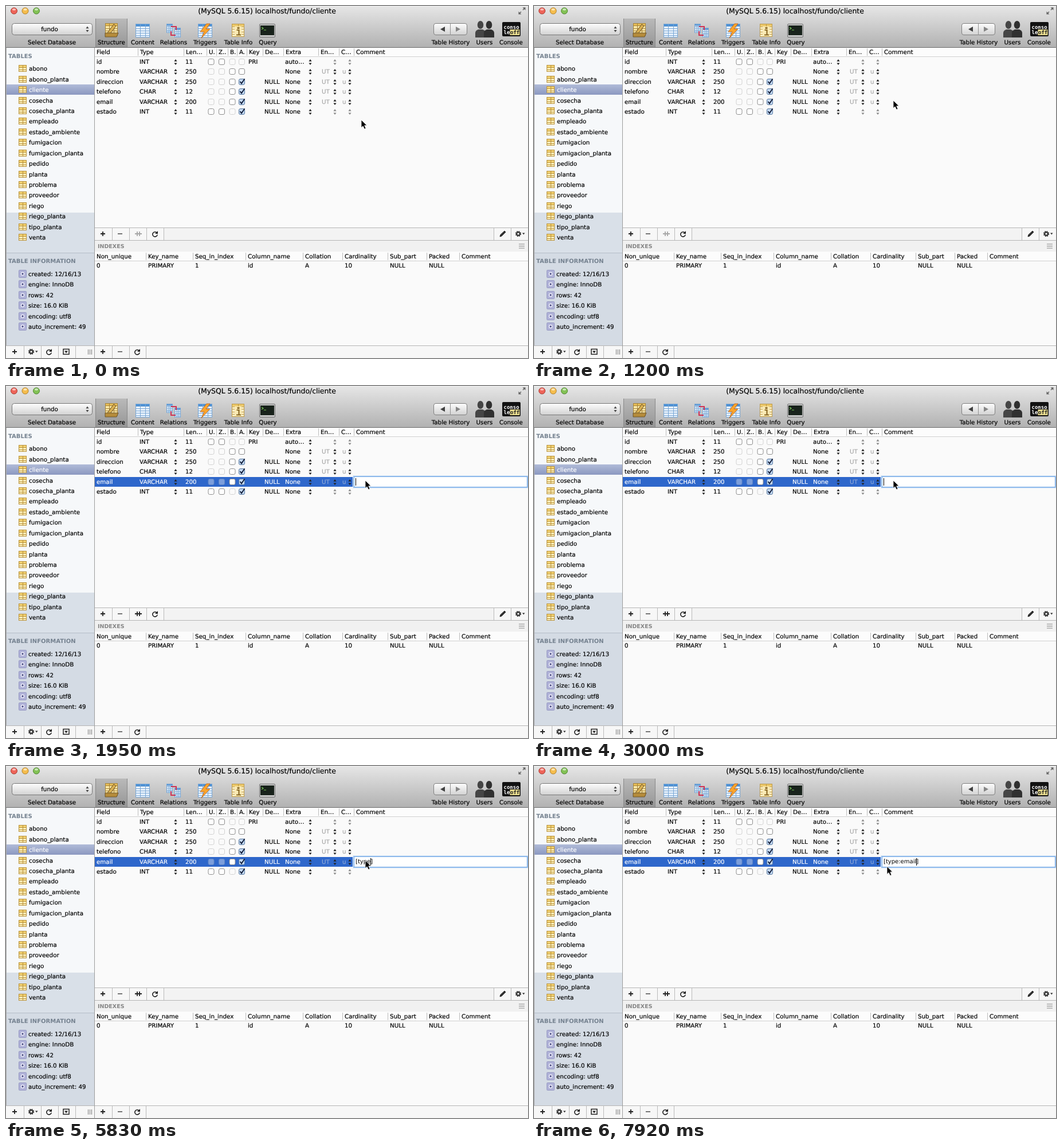
Write an HTML page that moves like this. It is 911 px wide and 615 px high and loops after 8000 ms.

```html
<!DOCTYPE html>
<html lang="es">
<head>
<meta charset="utf-8">
<title>Database table editor</title>
<style>
html, body { margin: 0; width: 100%; height: 100%; overflow: hidden; background: #fafafa; }
svg { position: absolute; left: 0; top: 0; }
svg text, #field { font: 10.3px "DejaVu Sans", Verdana, sans-serif; text-rendering: geometricPrecision; white-space: pre; }
svg text { fill: currentColor; stroke: currentColor; stroke-width: .2px; }
svg .mid { text-anchor: middle; }
svg .title { font-size: 12.4px; }
svg .head { font-weight: bold; font-size: 10px; color: #74818f; stroke: none; }
svg .idx { font-weight: bold; font-size: 9.5px; color: #858585; stroke: none; }
svg .white { color: #fff; }
svg .dim { color: #a8a8a8; }
svg .dimsel { color: #8fa9d8; }
svg .mono { font: bold 9px "DejaVu Sans Mono", monospace; color: #fff; stroke: none; }
svg .ink { color: #222; }

.sel, #field, #cursor, #field::before, #field::after {
  animation: 8s step-end -8ms infinite;
}
.sel { animation-name: select; }
#cursor { animation-name: move; }
#field {
  position: absolute; left: 608px; top: 159px; width: 301px; height: 17px;
  box-sizing: border-box; background: #fff;
  box-shadow: 0 0 0 1px #78abe6, 0 0 0 2px #a3c7f0, 0 0 0 3px #e0ecf9;
  display: flex; align-items: center; padding-left: 2px;
  font-size: 10px; line-height: 13px; animation-name: edit;
}
#field::before {
  content: ""; height: 13px; border-right: 1px solid #000; margin-right: -1px;
  animation-name: type, blink;
}
#field::after { content: ""; height: 13px; animation-name: close; }

@keyframes select { 0% { opacity: 0 } 22.5%, 100% { opacity: 1 } }
@keyframes edit { 0% { opacity: 0 } 24.375%, 100% { opacity: 1 } }
@keyframes move {
  0% { transform: translate(620px, 199px) }
  5.625% { transform: translate(624px, 197px) }
  7.5% { transform: translate(633px, 190px) }
  9.375% { transform: translate(640px, 182px) }
  11.25% { transform: translate(641px, 174px) }
  13.125% { transform: translate(634px, 168px) }
  15% { transform: translate(627px, 165px) }
  99%, 100% { transform: translate(616px, 175.5px) }
}
@keyframes type {
  0% { content: "" }
  39.375% { content: "[" }
  43.125% { content: "[]" }
  48.75% { content: "[" }
  54.375% { content: "" }
  58.125% { content: "[]" }
  63.75% { content: "[" }
  67.5% { content: "[t" }
  69.25% { content: "[ty" }
  71.125% { content: "[typ" }
  72.875% { content: "[type" }
  84.125% { content: "[type:" }
  87.875% { content: "[type:e" }
  89.75% { content: "[type:em" }
  91.625% { content: "[type:ema" }
  93.375%, 100% { content: "[type:email" }
}
@keyframes close { 0% { content: "" } 63.75%, 100% { content: "]" } }
@keyframes blink {
  0%, 37.5%, 84.125%, 100% { border-color: #000 }
  30%, 80.375% { border-color: transparent }
}
</style>
</head>
<body>
<svg id="app" width="911" height="615"></svg>
<div id="field"></div>
<svg width="911" height="615">
  <path id="cursor" d="M0 0V13.6L3.1 10.8L5.5 16L8 14.9L5.7 9.8H10Z" fill="#000" stroke="#fff" stroke-width=".8"/>
</svg>
<script>
const text = (x, y, s, cls = '') => `<text x="${x}" y="${y + 4}" class="${cls}">${s}</text>`;
const rect = (x, y, w, h, fill, more = '') => `<rect x="${x}" y="${y}" width="${w}" height="${h}" fill="${fill}" ${more}/>`;
const path = (d, stroke, w = 1, fill = 'none') => `<path d="${d}" stroke="${stroke}" stroke-width="${w}" fill="${fill}"/>`;
const vline = (x, y, h, c) => rect(x, y, 1, h, c);
const hline = (x, y, w, c) => rect(x, y, w, 1, c);
const grad = (id, a, b) => `<linearGradient id="${id}" x2="0" y2="1"><stop stop-color="${a}"/><stop offset="1" stop-color="${b}"/></linearGradient>`;
const dot = (x, y, r, fill, stroke = 'none') => `<circle cx="${x}" cy="${y}" r="${r}" fill="${fill}" stroke="${stroke}"/>`;
const each = (list, fn) => list.map(fn).join('');

const stepper = (x, y, c = '#222') =>
  path(`M${x - 2.6} ${y - 1.3}h5.2l-2.6 -3.6zM${x - 2.6} ${y + 1.5}h5.2l-2.6 3.6z`, 'none', 0, c);

// A small grid picture: header band plus ruled cells
const grid = (x, y, w, h, fill, line, cols, rows, head) => {
  let s = rect(x, y, w, h, fill) + rect(x, y, w, h / (rows + 1), head);
  for (let i = 1; i < cols; i++) s += vline(Math.round(x + i * w / cols), y, h, line);
  for (let i = 1; i <= rows; i++) s += hline(x, Math.round(y + i * h / (rows + 1)), w, line);
  return s + rect(x + .5, y + .5, w - 1, h - 1, 'none', `stroke="${line}"`);
};

const check = (x, y, state, sel) => {
  const off = state === '-';
  const fill = off ? (sel ? '#7c9edb' : '#fafafa') : state === 'x' ? '#c5daf3' : '#fff';
  const line = off ? (sel ? '#6186c4' : '#d2d2d2') : state === 'x' ? '#56779f' : '#8d8d8d';
  return rect(x - 5, y - 4.5, 10, 10, fill, `rx="2.5" stroke="${line}"`) +
    (state === 'x' ? path(`M${x - 3} ${y}l2.5 3.3l5.5 -8`, '#101c38', 1.9) : '');
};

const plus = (x, y, c = '#222') => path(`M${x - 4} ${y}h8M${x} ${y - 4}v8`, c, 1.8);
const minus = (x, y) => path(`M${x - 4} ${y}h8`, '#555', 1.6);
const reload = (x, y) => path(`M${x + 3.5} ${y - 2}a4.2 4.2 0 1 0 .7 3`, '#222', 1.6) +
  path(`M${x + 5} ${y - 5.5}v5h-5z`, 'none', 0, '#222');
const gear = (x, y) => `<circle cx="${x}" cy="${y}" r="3.6" fill="none" stroke="#333" stroke-width="3" stroke-dasharray="1.7 1.13"/>` +
  `<circle cx="${x}" cy="${y}" r="2.7" fill="none" stroke="#333" stroke-width="1.9"/>` +
  path(`M${x + 7} ${y - 1.5}h4.6l-2.3 3z`, 'none', 0, '#333');

const fields = [
  ['id', 'INT', 11, 'oo--', 'PRI', '', 'auto…', false],
  ['nombre', 'VARCHAR', 250, '--oo', '', '', 'None', true],
  ['direccion', 'VARCHAR', 250, '--ox', '', 'NULL', 'None', true],
  ['telefono', 'CHAR', 12, '--ox', '', 'NULL', 'None', true],
  ['email', 'VARCHAR', 200, '--ox', '', 'NULL', 'None', true],
  ['estado', 'INT', 11, 'oo-x', '', 'NULL', 'None', false],
];
const fieldRow = (i, sel = false) => {
  const [name, type, len, checks, key, def, extra, coded] = fields[i];
  const y = Math.round(97 + 17.45 * i), cls = sel ? 'white' : '', dim = sel ? 'dimsel' : 'dim';
  const cells = [[158, name], [233, type], [313, len], [423, key], [451, def], [487, extra]];
  return each(cells, ([x, s]) => text(x, y, s, cls)) +
    each([...checks], (c, k) => check([358, 376.5, 395, 411.5][k], y, c, sel)) +
    stepper(296, y + 1) + stepper(531, y + 1) +
    each([574, 600], x => stepper(x, y + 1, coded ? '#222' : '#8a8a8a')) +
    (coded ? text(551, y, 'UT', dim) + text(587, y, 'u', dim) : '');
};

const tables = ['abono', 'abono_planta', 'cliente', 'cosecha', 'cosecha_planta', 'empleado',
  'estado_ambiente', 'fumigacion', 'fumigacion_planta', 'pedido', 'planta', 'problema',
  'proveedor', 'riego', 'riego_planta', 'tipo_planta', 'venta'];
const info = ['created: 12/16/13', 'engine: InnoDB', 'rows: 42', 'size: 16.0 KiB', 'encoding: utf8', 'auto_increment: 49'];

const tableIcon = (x, y) => grid(x, y, 14, 12, '#fdeeb8', '#b8923c', 2, 2, '#f3d272');
const blueGrid = (x, y, w, h) => grid(x, y, w, h, '#eaf3fc', '#78a6d4', 3, 5, '#4a8fd4');
const person = (x, y, c) => `<ellipse cx="${x}" cy="${y}" rx="5.3" ry="7" fill="${c}"/>` +
  path(`M${x - 9} ${y + 22}v-8q0 -4 5 -6h8q5 2 5 6v8z`, 'none', 0, c);

const windowBar = () =>
  rect(0, 0, 911, 73, 'url(#bar)') + hline(0, 0, 911, '#f4f4f4') + hline(0, 72, 911, '#6f6f6f') +
  each([[14, '#ee6459', '#a83c33'], [33.5, '#f5bd4d', '#ad7d25'], [53, '#83c255', '#4f8434']],
    ([x, c, s]) => dot(x, 8.5, 5.5, c, s) + `<ellipse cx="${x}" cy="6" rx="3" ry="1.8" fill="#fff" opacity=".6"/>`) +
  text(455.5, 9, '(MySQL 5.6.15) localhost/fundo/cliente', 'mid title') +
  path('M902 7l4 -4M899 10l-4 4', '#666', 1.5) + path('M901.5 2.5h5v5zM894.5 9.5v5h5z', 'none', 0, '#666') +
  rect(10.5, 30.5, 140, 20, 'url(#button)', 'rx="4" stroke="#777"') +
  text(76, 40, 'fundo', 'mid') + stepper(142, 40.5, '#444') +
  rect(156, 22, 56, 50, 'url(#pressed)') + vline(156, 22, 50, '#888') + vline(211, 22, 50, '#888') +
  each([[80, 'Select Database'], [184, 'Structure'], [238.5, 'Content'], [292.5, 'Relations'], [347.5, 'Triggers'],
    [405.5, 'Table Info'], [457, 'Query'], [776, 'Table History'], [835, 'Users'], [881.5, 'Console']],
    ([x, s]) => text(x, 63, s, 'mid'));

const toolIcons = () =>
  grid(173, 30, 22, 22, '#fae7a6', '#a5833a', 3, 4, '#e6bd58') +
  path('M174 51L188 32l4 3l-13 17z', '#6b4f22', 1, '#d9b052') + path('M173 47h23l-3 7h-20z', '#6b5428', 1, '#b58b3a') +
  blueGrid(226, 31, 25, 24) +
  blueGrid(280, 31, 11, 16) + blueGrid(294, 38, 11, 17) + path('M288 36h9v6M288 44v7h8', '#cf3455', 2) +
  blueGrid(335, 31, 25, 24) + path('M350 31l-11 14h7l-5 11l15 -16h-7l7 -9z', '#bd5b10', .8, '#f9a52d') +
  grid(394, 31, 22, 23, '#fdf0c6', '#bd9a4a', 2, 4, '#ecc869') + rect(399, 36, 12, 17, '#faeab4') +
  rect(403.5, 37, 4, 3, '#8a6a28') + path('M402.5 42h4v8M402 50.5h8', '#8a6a28', 2.2) +
  rect(442.5, 31.5, 27, 23, '#c9c9c9', 'rx="1.5" stroke="#707070"') + rect(444, 34, 24, 17, '#18221b') +
  path('M446 37l3 2l-3 2M450 42h4', '#78c557', 1.2) +
  rect(746.5, 30.5, 58, 20, 'url(#button)', 'rx="3.5" stroke="#808080"') + vline(775, 31, 20, '#929292') +
  path('M766 36v9l-8 -4.5z', 'none', 0, '#404040') + path('M785 36v9l8 -4.5z', 'none', 0, '#858585') +
  person(828, 33, '#454545') + person(843, 33, '#303030') +
  rect(866, 28, 32, 25, '#111', 'rx="2"') + text(868.5, 36, 'conso', 'mono') + text(868.5, 45, 'le', 'mono') +
  rect(879.5, 41, 17, 10, '#e5d98c') + text(880, 45, 'off', 'mono ink');

const sidebar = () =>
  rect(0, 73, 154, 288, '#f6f8fa') + rect(0, 361, 154, 70, '#d9e0e8') + rect(0, 431, 154, 162, '#d4dbe4') +
  hline(0, 431, 154, '#b4bdc8') + rect(0, 137, 154, 18, 'url(#chosen)') +
  text(4, 87, 'TABLES', 'head') + text(4, 445, 'TABLE INFORMATION', 'head') +
  each(tables, (s, i) => {
    const y = Math.round(109.3 + 18.42 * i);
    return tableIcon(22, y - 6) + text(40, y, s, i === 2 ? 'white' : '');
  }) +
  each(info, (s, i) => {
    const y = Math.round(468 + 18.4 * i);
    return rect(22.5, y - 6.5, 13, 13, '#b0b2d8', 'rx="1" stroke="#9597c2"') +
      dot(29, y, 3.2, '#eeeefa') + dot(29, y, 1.7, '#4c4e86') + text(39, y, s);
  }) +
  vline(154, 73, 542, '#9c9c9c') + vline(0, 73, 542, '#aaa');

const fieldHeads = [[158, 'Field'], [234, 'Type'], [314, 'Len…'], [354, 'U.'], [371, 'Z..'], [391, 'B.'], [407, 'A.'],
  [424, 'Key'], [452, 'De…'], [488, 'Extra'], [549, 'En…'], [585, 'C…'], [611, 'Comment']];
const indexHeads = [[158, 'Non_unique', '0'], [248, 'Key_name', 'PRIMARY'], [330, 'Seq_in_index', '1'], [422, 'Column_name', 'id'],
  [522, 'Collation', 'A'], [591, 'Cardinality', '10'], [670, 'Sub_part', 'NULL'], [738, 'Packed', 'NULL'], [795, 'Comment', '']];
const heads = (list, y) => rect(155, y - 7, 756, 15, '#fcfcfc') + hline(155, y + 8, 756, '#d0d0d0') +
  each(list, ([x, s], i) => (i ? vline(x - 4, y - 6, 13, '#bcbcbc') : '') + text(x, y, s));

const footer = (x, y, w, seps) => rect(x, y, w, 22, '#f7f7f7') + hline(x, y, w, '#b5b5b5') +
  each(seps, s => vline(s, y, 22, '#bababa'));

const duplicate = c => plus(229, 398, c) + plus(233, 398, c);

const main = () =>
  rect(155, 73, 756, 542, '#fafafa') + heads(fieldHeads, 80) + each(fields, (_, i) => fieldRow(i)) +
  footer(155, 387, 756, [185, 215, 245, 275, 851, 881]) + rect(276, 388, 575, 21, '#f3f3f3') +
  plus(169, 398) + minus(199, 398) + duplicate('#a6a6a6') + reload(260, 398.5) + gear(894, 398) +
  path('M862 403l1 -3.5l7 -6.5l2 2l-7 7z', '#222', 1, '#333') +
  rect(155, 409, 756, 20, '#f1f1f1') + hline(155, 409, 756, '#b5b5b5') + text(160, 419, 'INDEXES', 'idx') +
  path('M895 416h10M895 419.5h10M895 423h10', '#858585', 1.2) +
  heads(indexHeads, 437) + each(indexHeads, ([x, , s]) => text(x, 453, s)) +
  footer(155, 593, 756, [185, 215, 244]) + plus(169, 604) + minus(199, 604) + reload(229, 604.5) +
  footer(0, 593, 154, [31, 61, 91, 121]) + plus(15, 604) + gear(44, 604) + reload(75, 604.5) +
  rect(100, 599.5, 10, 9, 'none', 'stroke="#222" stroke-width="1.5"') + path('M102 602.5h6l-3 4z', 'none', 0, '#222') +
  each([143, 146, 149], x => vline(x, 600, 9, '#777'));

const selection = () => '<g class="sel">' + rect(155, 159, 756, 17, '#2e67cb') + fieldRow(4, true) +
  rect(222, 392, 16, 12, '#f7f7f7') + duplicate('#222') + '</g>';

document.getElementById('app').innerHTML =
  `<defs>${grad('bar', '#e6e6e6', '#b1b1b1')}${grad('button', '#fdfdfd', '#d2d2d2')}` +
  `${grad('pressed', '#b9b9b9', '#969696')}${grad('chosen', '#b0bbd8', '#8b98c0')}</defs>` +
  windowBar() + toolIcons() + sidebar() + main() + selection();
</script>
</body>
</html>
```
